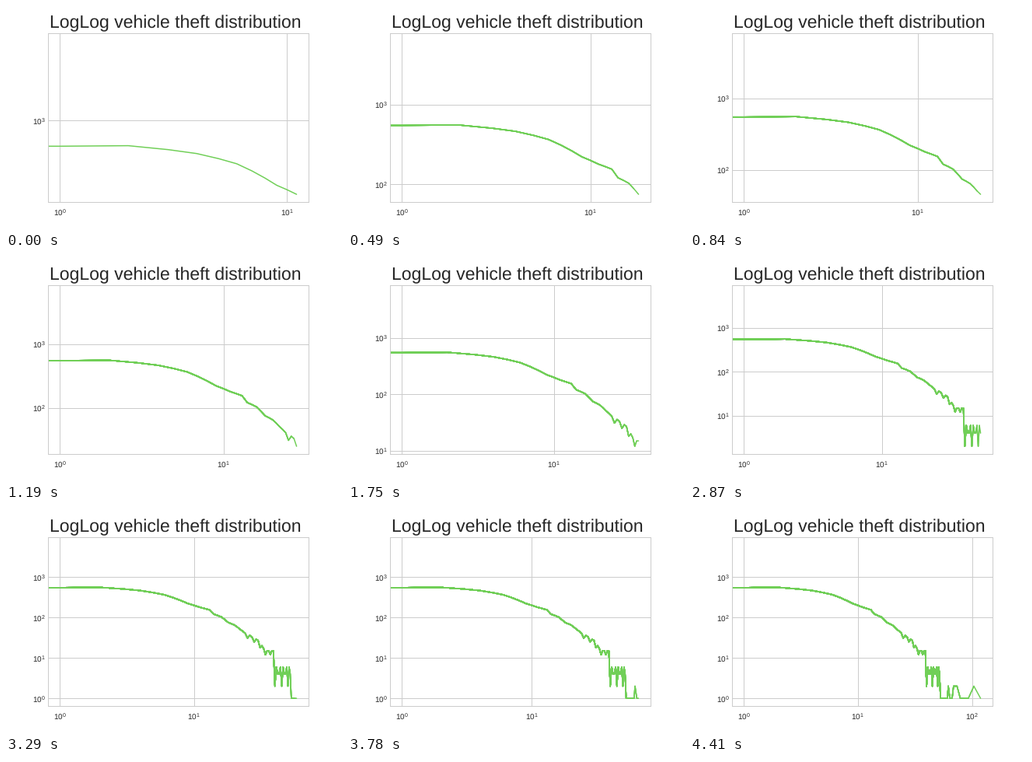
Animation of 432 by 288 pixels, one loop 5180 ms. Source, as a matplotlib script:

```python
import matplotlib.pyplot as plt
import numpy as np
from matplotlib.animation import FuncAnimation
from matplotlib.ticker import NullFormatter

W, H, DPI = 432, 288, 72
STEP_MS, FRAMES, FIRST = 70, 74, 12
GREEN, GREY, INK = "#70cf57", "0.8", "0.15"

plt.rcParams.update({
    "font.family": "Liberation Sans", "font.size": 10, "text.hinting": "none",
    "text.color": INK, "xtick.color": INK, "ytick.color": INK,
    "axes.edgecolor": GREY, "axes.linewidth": 1, "axes.axisbelow": True,
    "grid.color": GREY, "grid.linewidth": 1,
    "xtick.major.size": 0, "xtick.minor.size": 0, "xtick.major.pad": 7,
    "ytick.major.size": 0, "ytick.minor.size": 0,
    "lines.solid_capstyle": "round",
})


def make_data():
    """Thefts per day, and the number of days with that many."""
    n = np.arange(75)
    # Every count up to 62 occurs, then the gaps grow
    thefts = np.append(n[:63], 62 + np.geomspace(2, 57, 12).round())

    keys = [(1, 550), (2, 557), (4, 464), (6, 366), (9, 222), (11, 180),
            (13, 155), (14, 121), (16, 103), (18, 75), (20, 65), (25, 36),
            (30, 25), (34, 14), (39, 14)]
    at, value = np.transpose(keys)
    smooth = np.exp(np.interp(n, at, np.log(value)))
    ripple = smooth * (1 - 0.15 * np.cos(2 * np.pi * (n - 1) / 3))
    spikes = np.floor(2 + 5 * np.abs(np.sin(0.4 * np.pi * n)))

    days = np.select([n < 25, n < 40, n < 53], [smooth, ripple, spikes], 1).round()
    days[0] = 6400
    days[[62, 67, 68, 69, 73]] = 2
    return thefts, days


def padded(lo, hi, margin=0.05):
    """Axis limits with an even margin in log space."""
    pad = (hi / lo) ** margin
    return lo / pad, hi * pad


thefts, days = make_data()

fig = plt.figure(figsize=(W / DPI, H / DPI), dpi=DPI, facecolor="white")
ax = fig.add_axes([0.125, 0.125, 0.775, 0.755])
ax.set_xscale("log", nonpositive="clip")
ax.set_yscale("log", nonpositive="clip")
for axis in (ax.xaxis, ax.yaxis):
    axis.set_minor_formatter(NullFormatter())
ax.grid(True, which="major")
fig.text(217.5 / W, 1 - 28.6 / H, "LogLog vehicle theft distribution",
         fontsize=23, ha="center", va="baseline")

# Each step lays a longer curve over the earlier ones
lines = [ax.plot(thefts[:n], days[:n], color=GREEN, lw=1.5)[0]
         for n in range(FIRST, len(thefts) + 1)]


def draw(frame):
    last = min(frame, len(lines) - 1)
    for i, line in enumerate(lines):
        line.set_visible(i <= last)
    n = FIRST + last
    ax.set_xlim(*padded(1, thefts[n - 1]))
    ax.set_ylim(*padded(days[:n].min(), days[0]))
    return lines


anim = FuncAnimation(fig, draw, frames=FRAMES, interval=STEP_MS, repeat=True,
                     repeat_delay=0, blit=False)
plt.show()
```
